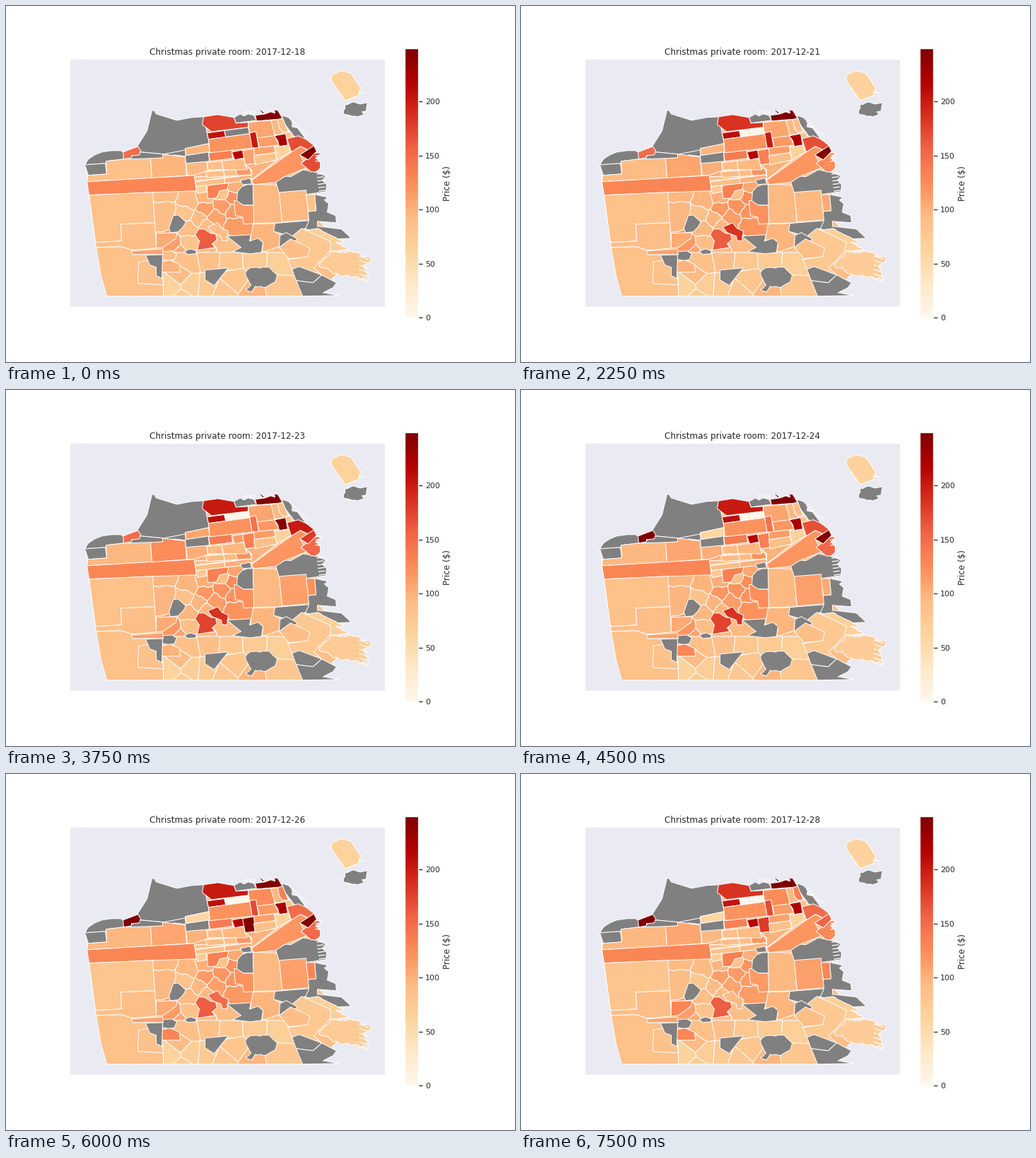
Animation of 720 by 504 pixels, one loop 8000 ms. Source, as a matplotlib script:

```python
import numpy as np
import matplotlib.pyplot as plt
from matplotlib.animation import FuncAnimation
from matplotlib.cm import ScalarMappable
from matplotlib.colors import Normalize
from matplotlib.patches import Polygon

W, H, DPI = 720, 504, 72
INK, PANEL, GREY = "#262626", "#eaeaf2", "#808080"
STEP, DAYS = 3, 11          # frames per day, number of days
OFFSET = (0.5, 0.8)         # pixel centres

plt.rcParams.update({"font.family": "DejaVu Sans", "text.color": INK})
fig = plt.figure(figsize=(W / DPI, H / DPI), dpi=DPI, facecolor="white")


def add_axes(x0, y0, x1, y1):
    return fig.add_axes([x0 / W, 1 - y1 / H, (x1 - x0) / W, (y1 - y0) / H])


ax = add_axes(90, 75.4, 536.4, 426.1)
ax.set(xlim=(90, 536.4), ylim=(426.1, 75.4), xticks=[], yticks=[],
       facecolor=PANEL)
for spine in ax.spines.values():
    spine.set(edgecolor="white", linewidth=1.25)
title = ax.set_title("", fontsize=12, pad=6)

scale = ScalarMappable(Normalize(0, 249), "OrRd")
cax = add_axes(564.3, 60.48, 583.33, 441)
bar = fig.colorbar(scale, cax=cax, ticks=range(0, 201, 50))
bar.outline.set(edgecolor="white", linewidth=1.25)
bar.set_label("Price ($)", fontsize=12, color=INK, labelpad=4)
cax.tick_params(length=6, width=1.25, pad=3.5, labelsize=11, color=INK,
                labelcolor=INK)

zones = []


def roughen(points, amp, step=4):
    """Break each edge into small seeded jogs, the same from both sides."""
    out = []
    for a, b in zip(points, np.roll(points, -1, axis=0)):
        lo, hi = sorted((tuple(a), tuple(b)))
        run = np.subtract(hi, lo)
        length = np.hypot(*run)
        if length < 1e-6:
            continue
        n = max(1, int(length / step))
        rng = np.random.default_rng(int(round(sum(lo) * 3 + sum(hi) * 5)))
        shift = rng.uniform(-amp, amp, n + 1)
        shift[[0, -1]] = 0
        normal = np.array([-run[1], run[0]]) / length
        line = lo + np.linspace(0, 1, n + 1)[:, None] * run
        line = line + shift[:, None] * normal
        out.extend((line if lo == tuple(a) else line[::-1])[:-1])
    return np.array(out)


def zone(price, *xy, later=None, swell=0, rough=0):
    """Add a district. Price 0 means no data; `later` maps a day to a new price."""
    points = np.reshape(xy, (-1, 2)).astype(float)
    if rough:
        points = roughen(points, rough)
    shape = Polygon(points + OFFSET, closed=True, facecolor=GREY,
                    edgecolor="white", linewidth=1, joinstyle="round")
    ax.add_patch(shape)
    days = np.arange(DAYS)
    prices = price + swell * np.sin(np.pi * days / (DAYS - 1))
    for day, value in (later or {}).items():
        prices[day:] = value
    zones.append((shape, prices))


def strip(prices, cuts, top, bottom):
    """Cut the band between two lines (x0, y0, x1, y1) into districts."""
    top, bottom = np.reshape(top, (2, 2)), np.reshape(bottom, (2, 2))
    at = [0, *cuts, 1]
    for price, s, t in zip(prices, at, at[1:]):
        corners = [line[0] + (line[1] - line[0]) * u
                   for line, u in ((top, s), (top, t), (bottom, t), (bottom, s))]
        zone(price, *np.ravel(corners), swell=4)


def nearer(poly, p, q):
    """Part of a polygon that lies nearer to p than to q."""
    dist = (poly - (p + q) / 2) @ (q - p)
    out = []
    for i in range(len(poly)):
        a, b, da, db = poly[i - 1], poly[i], dist[i - 1], dist[i]
        if da * db < 0:
            out.append(a + (b - a) * da / (da - db))
        if db <= 0:
            out.append(b)
    return np.array(out)


def cells(x0, y0, x1, y1, seeds, **style):
    """Fill a box with one cell around each seed (x, y, price)."""
    for seed in seeds:
        poly = np.array([(x0, y0), (x1, y0), (x1, y1), (x0, y1)], float)
        here = np.array(seed[:2], float)
        for other in seeds:
            if other is not seed:
                poly = nearer(poly, here, np.array(other[:2], float))
        zone(seed[2], *poly.ravel(), **style)


def piers(x0, y0, x1, y1, count, dx, dy):
    for x, y in zip(np.linspace(x0, x1, count), np.linspace(y0, y1, count)):
        ax.plot([x, x + dx], [y, y + dy], color="white", lw=1.3)


# city ground
zone(88, 112, 224, 165, 206, 190, 206, 280, 170, 352, 157, 420, 187, 440, 235,
     440, 300, 470, 335, 470, 375, 440, 409, 142, 410, 126, 335, 117, 267)

# central hills and southern quarters
cells(207, 232, 351, 352, [
    (224, 261, 92), (224, 293, 91), (253, 294, 80), (260, 275, 92),
    (279, 270, 98), (281, 286, 112), (272, 300, 92), (296, 299, 108),
    (258, 314, 90), (284, 312, 92), (307, 336, 88), (258, 335, 84),
    (236, 338, 112), (245, 346, 105), (306, 281, 115), (317, 269, 120),
    (307, 265, 82), (322, 256, 102), (324, 310, 114), (283, 346, 88),
    (323, 290, 115)], swell=6, rough=1.3)
cells(220, 348, 425, 410, [
    (258, 362, 87), (285, 357, 88), (246, 380, 92), (233, 397, 64),
    (260, 394, 70), (248, 414, 75), (285, 396, 75), (318, 360, 78),
    (306, 404, 78), (322, 386, 80), (351, 358, 73), (386, 360, 69),
    (384, 400, 79), (350, 406, 98)])
zone(115, 322, 275, 334, 274, 335, 281, 350, 281, 351, 307, 336, 308, 334, 298,
     324, 296, swell=8)
zone(135, 289, 248, 309, 244, 314, 252, 312, 259, 302, 261, 297, 271, 285, 272,
     284, 256)
zone(88, 285, 312, 299, 306, 305, 314, 314, 318, 312, 332, 305, 331, 304, 325,
     291, 320, later={1: 145, 3: 185, 8: 150, 10: 95})
zone(160, 267, 323, 272, 315, 280, 315, 289, 321, 296, 322, 298, 330, 291, 336,
     295, 341, 270, 345, 273, 332, later={4: 175, 8: 160})
zone(105, 212, 321, 242, 320, 240, 328, 222, 341, 212, 342, later={10: 130})
zone(90, 221, 347, 234, 346, 241, 350, 238, 358, 231, 360, 221, 358,
     later={1: 0})
zone(100, 220, 361, 232, 359, 245, 365, 246, 376, 220, 376, later={6: 130})
zone(0, 236, 296, 243, 295, 254, 305, 250, 312, 243, 319, 232, 320, 230, 314)
zone(0, 252, 346, 261, 343, 269, 346, 268, 350, 256, 351)

# west
zone(0, 111, 224, 116, 216, 125, 210, 135, 206, 149, 204, 162, 204, 166, 207,
     166, 216, 141, 219, 141, 222)
zone(0, 111, 224, 140, 222, 142, 237, 116, 239)
zone(0, 185, 198, 199, 176, 206, 147, 209, 147, 212, 152, 241, 161, 262, 157,
     279, 156, 287, 194, 253, 201, 253, 204, 223, 209, 190, 206)
zone(0, 166, 217, 177, 212, 190, 206, 223, 209, 253, 203, 254, 212, 236, 210,
     235, 213, 204, 216)
zone(150, 165, 206, 186, 198, 190, 204, 188, 210, 177, 211, 177, 214, 166, 216,
     later={6: 248})
zone(86, 141, 219, 166, 216, 204, 215, 206, 243, 114, 248, 115, 239, 142, 237,
     later={2: 92, 4: 96})
zone(98, 204, 215, 221, 214, 221, 209, 253, 213, 255, 239, 206, 243,
     later={3: 108, 4: 125, 6: 107})
zone(95, 254, 222, 283, 218, 285, 232, 265, 239, 256, 239, swell=8)
zone(98, 253, 201, 286, 194, 288, 206, 254, 211, later={4: 108, 6: 60})
zone(0, 253, 211, 286, 206, 287, 219, 254, 222)
zone(130, 114, 248, 266, 239, 269, 261, 208, 263, 117, 267)
zone(86, 117, 267, 207, 263, 210, 306, 162, 308, 163, 332, 126, 334, 122, 304,
     later={8: 81})
zone(90, 162, 308, 210, 306, 212, 342, 178, 345, 163, 340, 127, 341, 126, 334,
     163, 332)
zone(86, 127, 341, 163, 340, 178, 345, 178, 351, 198, 351, 222, 384, 222, 410,
     142, 410, 134, 382)
zone(86, 187, 362, 200, 359, 212, 369, 212, 381, 221, 384, 222, 394, 186, 392)
zone(0, 197, 352, 221, 351, 220, 385, 212, 381, 212, 369, 203, 366)
zone(110, 177, 346, 221, 343, 222, 351, 178, 351)

# middle blocks, row by row
strip([87, 97], [0.52], (267, 248, 347, 238), (269, 255, 347, 246))
strip([86, 90], [0.5], (266, 241, 347, 238), (267, 247, 347, 238))
strip([90, 90, 118], [0.4, 0.68], (282, 234, 344, 229), (284, 242, 347, 238))
strip([90, 92], [0.4], (284, 221, 336, 215), (285, 231, 340, 231))
strip([70], [], (268, 255, 282, 253), (270, 265, 284, 262))
zone(100, 338, 224, 383, 217, 347, 245, 347, 231)
zone(0, 331, 246, 345, 243, 347, 251, 334, 252)
zone(0, 327, 262, 333, 255, 341, 252, 349, 252, 350, 281, 335, 281, 326, 275)

# north shore
zone(108, 342, 164, 374, 161, 380, 171, 379, 184, 356, 187, 344, 179,
     later={8: 125})
zone(175, 279, 156, 299, 153, 322, 157, 325, 165, 342, 164, 342, 171, 290, 177,
     277, 167, later={1: 185, 4: 200, 10: 185})
strip([205, 0], [0.42], (284, 179, 342, 171), (286, 188, 344, 180))
zone(0, 322, 157, 331, 152, 336, 155, 342, 152, 350, 154, 354, 161, 325, 165)
zone(248, 352, 154, 366, 152, 374, 149, 380, 151, 379, 146, 384, 147, 391, 159,
     354, 162)
zone(248, 357, 146, 359, 146, 365, 150, 363, 152)
zone(0, 390, 154, 399, 157, 405, 163, 404, 170, 412, 172, 424, 188, 407, 184,
     392, 164)
zone(95, 374, 161, 384, 160, 387, 172, 393, 180, 380, 182)
zone(88, 384, 160, 391, 158, 399, 178, 391, 178, 386, 172, later={8: 135})
zone(85, 391, 178, 403, 178, 405, 185, 396, 187)
zone(120, 286, 188, 344, 180, 350, 202, 288, 207)
zone(200, 344, 179, 353, 177, 357, 200, 348, 202, later={4: 145, 8: 171})
strip([114], [], (355, 186, 379, 183), (358, 200, 386, 196))
strip([135, 100, 100, 110], [0.35, 0.53, 0.68], (286, 207, 380, 197),
      (288, 219, 380, 207))
zone(215, 319, 206, 335, 203, 338, 214, 323, 217,
     later={1: 135, 3: 215, 4: 115, 6: 215})
zone(110, 334, 204, 350, 201, 352, 222, 338, 224,
     later={1: 120, 3: 135, 8: 248, 10: 180})
strip([85], [], (350, 211, 380, 207), (352, 224, 383, 217))
zone(65, 379, 198, 398, 197, 403, 205, 383, 217)
zone(220, 379, 183, 395, 180, 398, 196, 386, 198, 384, 190,
     later={4: 245, 6: 220})
zone(169, 397, 187, 413, 183, 424, 188, 437, 198, 427, 203, 416, 198, 403, 206,
     later={4: 200, 6: 168, 8: 150})

# east side
zone(95, 349, 251, 386, 253, 390, 306, 350, 307)
zone(0, 381, 248, 395, 240, 402, 241, 420, 231, 440, 235, 452, 240, 447, 246,
     453, 252, 452, 262, 424, 266, 386, 264)
zone(119, 347, 246, 403, 206, 416, 198, 426, 203, 416, 211, 425, 228, 393, 241,
     381, 249, 350, 252)
zone(171, 417, 222, 437, 206, 445, 208, 438, 214, 444, 221, 444, 229, 438, 234,
     431, 234, later={3: 125, 4: 152, 10: 128})
zone(248, 415, 210, 435, 197, 439, 205, 427, 217,
     later={4: 180, 6: 248, 10: 155})
zone(0, 428, 290, 438, 289, 436, 266, 455, 270, 450, 274, 456, 279, 454, 291,
     466, 296, 467, 306, 440, 304, 440, 311, 474, 315, 488, 328, 468, 329,
     415, 312)
zone(0, 378, 307, 428, 303, 424, 313, 404, 326, 378, 318)
zone(95, 386, 263, 424, 260, 428, 302, 390, 305, later={4: 111})
zone(85, 424, 266, 436, 266, 438, 289, 427, 290,
     later={1: 105, 4: 122, 6: 105, 8: 130})
zone(98, 349, 308, 380, 307, 378, 318, 389, 324, 385, 340, 362, 348, 363, 334,
     345, 331)
zone(0, 312, 325, 346, 323, 344, 332, 356, 328, 363, 334, 361, 348, 345, 350,
     320, 347, 332, 341)

# south-east
zone(68, 413, 318, 440, 314, 478, 333, 466, 334, 484, 344, 459, 346, rough=1)
zone(77, 398, 330, 418, 314, 459, 333, 458, 346, 435, 370, 446, 380, 404, 372,
     398, 358, 426, 354)
zone(0, 387, 324, 396, 320, 412, 329, 399, 340, 386, 341)
zone(90, 386, 341, 402, 329, 429, 342, 426, 354, 400, 357)
zone(72, 459, 346, 498, 348, 516, 357, 506, 366, 513, 386, 476, 382, 458, 374,
     442, 367, rough=2.5)
zone(0, 281, 373, 314, 370, 305, 381, 294, 395, 281, 387)
zone(0, 338, 377, 345, 370, 372, 369, 383, 380, 380, 390, 368, 397, 352, 396,
     347, 404, 338, 401, 346, 394, rough=1)
zone(0, 404, 372, 414, 368, 446, 380, 434, 391, 410, 388)
zone(0, 410, 388, 434, 391, 446, 380, 467, 391, 462, 398, 448, 405, 470, 409,
     419, 410)

# islands
zone(0, 479, 139, 491, 135, 500, 138, 511, 136, 509, 148, 503, 149, 506, 153,
     497, 156, 477, 152, rough=1)
zone(65, 461, 96, 473, 91, 487, 94, 501, 115, 498, 126, 479, 133, 459, 104)

# piers and breakwaters
piers(404, 164, 424, 183, 8, 3, -2)
piers(438, 208, 438, 220, 4, 6, -1)
piers(440, 238, 443, 262, 6, 8, -1)
piers(336, 152, 350, 152, 4, 2, -3)
piers(500, 354, 500, 386, 6, 12, 4)
piers(499, 122, 499, 122, 1, 8, 1)


def update(frame):
    day = frame // STEP
    title.set_text(f"Christmas private room: 2017-12-{18 + day}")
    for shape, prices in zones:
        price = prices[day]
        shape.set_facecolor(scale.to_rgba(price) if price > 0 else GREY)


# 250 ms ticks: each day lasts 750 ms, the last one 500 ms
anim = FuncAnimation(fig, update, frames=32, interval=250, repeat=True,
                     repeat_delay=0, cache_frame_data=False)
plt.show()
```
